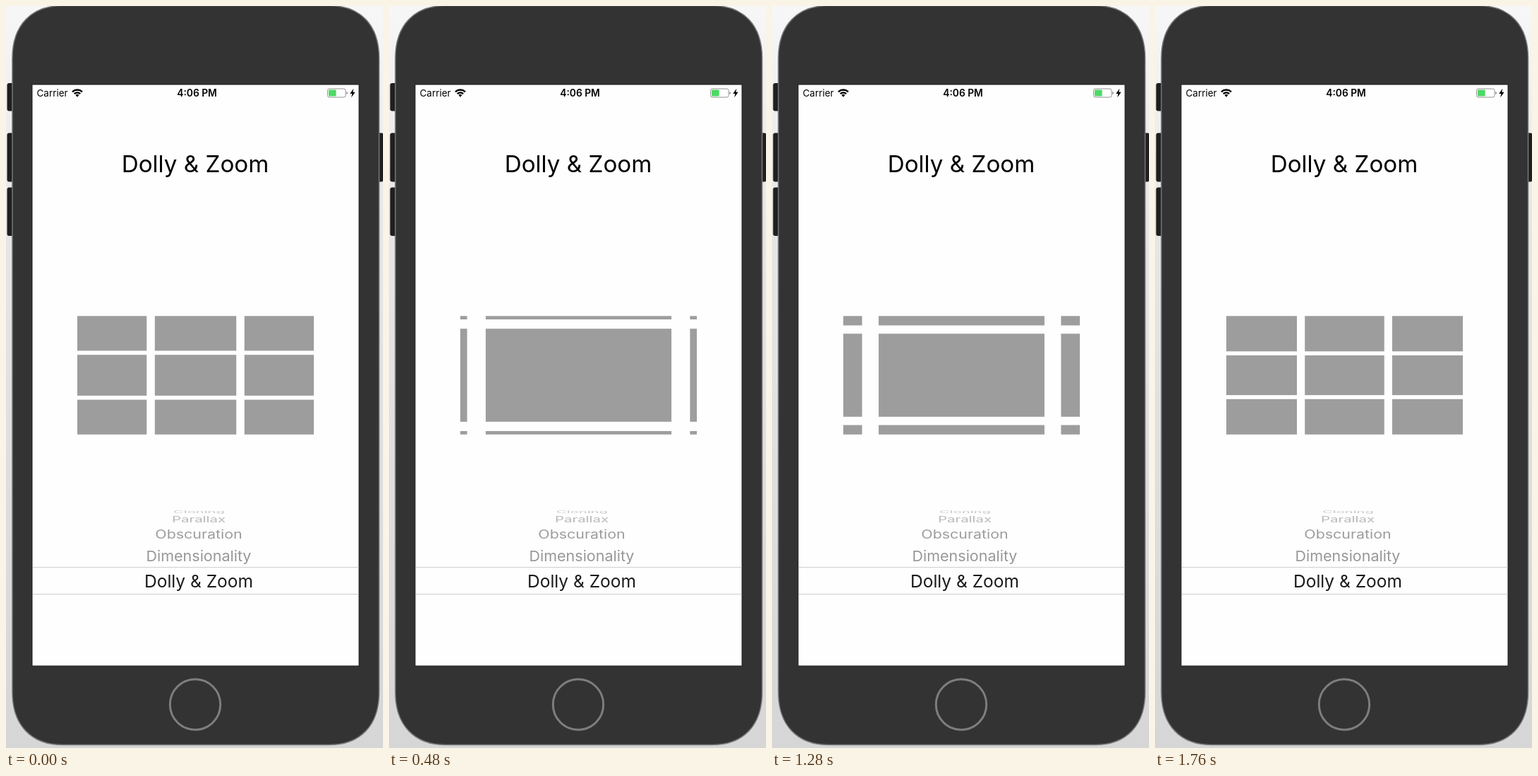
An HTML page for the animation above (1840 ms loop, 534x1049 px).

```html
<!DOCTYPE html>
<html lang="en">
<head>
<meta charset="utf-8">
<title>Dolly &amp; Zoom</title>
<style>
  html, body { margin: 0; width: 100%; height: 100%; overflow: hidden; background: #e4e4e4; }
  svg { display: block; }
  text { font-family: Inter, "Liberation Sans", sans-serif; font-optical-sizing: none; }
  .mid { text-anchor: middle; }
  .line { stroke: #cfcfcf; stroke-width: 1; }
</style>
</head>
<body>
<svg width="534" height="1049" viewBox="0 0 534 1049">
  <defs>
    <linearGradient id="wall" x2="0" y2="1">
      <stop stop-color="#f7f7f7"/>
      <stop offset=".3" stop-color="#e6e6e6"/>
      <stop offset="1" stop-color="#d6d6d6"/>
    </linearGradient>
  </defs>
  <rect width="534" height="1049" fill="url(#wall)"/>

  <g fill="#1f1f1f">
    <rect x="1.5" y="109" width="12" height="39.5" rx="3"/>
    <rect x="1.5" y="179.5" width="12" height="69" rx="3"/>
    <rect x="1.5" y="256.5" width="12" height="68.5" rx="3"/>
    <rect x="522" y="179.5" width="12.5" height="69" rx="3"/>
  </g>
  <path d="M9 74C9 27 36 -.5 80 -.5H458C502 -.5 528.5 27 528.5 74V970C528.5 1017 502 1044.5 458 1044.5H80C36 1044.5 9 1017 9 970Z"
    fill="#333" stroke="#777" stroke-width="1.5"/>
  <rect x="37" y="111" width="463" height="822" fill="#fefefe" stroke="#1c1c1c"/>
  <circle cx="268" cy="987.5" r="35.7" fill="none" stroke="#7e7e7e" stroke-width="3"/>

  <text x="43.5" y="128" font-size="13.5">Carrier</text>
  <g fill="none" stroke="#000" stroke-width="2.4">
    <path d="M94 121.3A10.2 10.2 0 0 1 108 121.3M96.8 124.2A6.2 6.2 0 0 1 105.2 124.2"/>
    <path d="M98.6 126A3.5 3.5 0 0 1 103.4 126L101 128.7Z" fill="#000" stroke="none"/>
  </g>
  <text class="mid" x="270.5" y="128" font-size="13.8" font-weight="600">4:06 PM</text>
  <rect x="455.5" y="117" width="25.5" height="12" rx="2.5" fill="#fff" stroke="#929292"/>
  <rect x="457" y="118.6" width="10.6" height="8.8" rx="1" fill="#4cd964"/>
  <path d="M482.2 121Q484 121.3 484 123T482.2 125Z" fill="#929292"/>
  <path d="M492.3 116.8L487.2 124H490.3L489.2 129.3L494.6 121.8H491.3Z"/>

  <text class="mid" x="268" y="235" font-size="33.2">Dolly &amp; Zoom</text>

  <svg id="view" x="101" y="438.25" width="335" height="167.5" viewBox="-167.5 -83.75 335 167.5" overflow="hidden">
    <g id="grid" fill="#9d9d9d"></g>
  </svg>

  <g class="mid">
    <text transform="translate(273.5 716.6) scale(1 .26)" font-size="20.2" fill="#c9c9c9">Cloning</text>
    <text transform="translate(273 729.6) scale(1 .56)" font-size="20.4" fill="#b9b9b9">Parallax</text>
    <text transform="translate(273 753) scale(1 .78)" font-size="21.4" fill="#9c9c9c">Obscuration</text>
    <text transform="translate(273 785) scale(1 .96)" font-size="21.5" fill="#979797">Dimensionality</text>
    <text x="273" y="821.7" font-size="24.5" fill="#1b1b1b">Dolly &amp; Zoom</text>
  </g>
  <path class="line" d="M38 793.5H499.5M38 831.5H499.5"/>
</svg>
<script>
const LOOP = 1840, STEP = 80, CELL = 335 / 3, PITCH = 1.1;
// [time in ms, zoom phase]: 0 is far, 1 is near, 2 is far again
const keys = [[0, .092], [320, .441], [640, .7715], [960, 1.1165],
  [1280, 1.47], [1440, 1.637], [1760, 1.956]];
const grid = document.getElementById('grid');

for (let row = -1; row <= 1; row++) {
  for (let col = -1; col <= 1; col++) {
    const cell = document.createElementNS('http://www.w3.org/2000/svg', 'rect');
    const box = { x: col * PITCH - .5, y: (row * PITCH - .5) / 2, width: 1, height: .5 };
    for (const name in box) cell.setAttribute(name, box[name]);
    grid.append(cell);
  }
}

function phaseAt(t) {
  const i = Math.max(1, keys.findIndex(k => k[0] >= t));
  const [t0, p0] = keys[i - 1], [t1, p1] = keys[i];
  return p0 + (p1 - p0) * (t - t0) / (t1 - t0);
}

// cubic-bezier(.42, 0, .58, 1)
function easeInOut(x) {
  let lo = 0, hi = 1;
  for (let i = 0; i < 24; i++) {
    const s = (lo + hi) / 2, r = 1 - s;
    if (1.26 * s * r * r + 1.74 * s * s * r + s * s * s < x) lo = s;
    else hi = s;
  }
  return lo * lo * (3 - 2 * lo);
}

function draw(now) {
  const t = Math.floor(now % LOOP / STEP) * STEP;
  const zoom = easeInOut(1 - Math.abs(1 - phaseAt(t)));
  grid.setAttribute('transform', `scale(${CELL * (1 + 2 * zoom)})`);
}

function tick() {
  draw(performance.now() - start);
  requestAnimationFrame(tick);
}

const start = performance.now();
tick();
</script>
</body>
</html>
```
